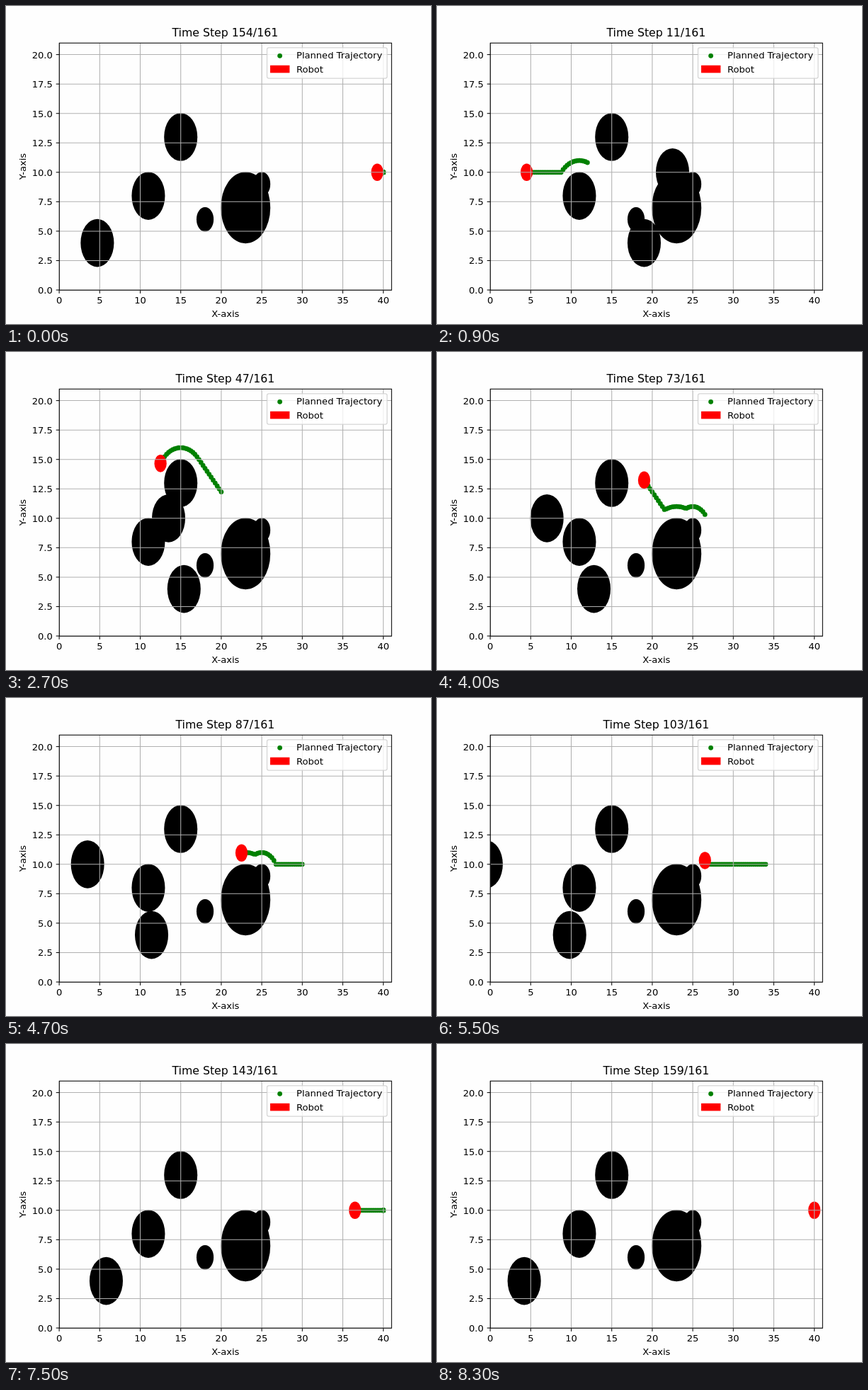
Write an HTML page with a canvas that moves like this. It is 600x449 px and loops after 8400 ms.

```html
<!DOCTYPE html>
<html lang="en">
<head>
<meta charset="utf-8">
<title>Robot path planning</title>
<style>
  html, body { margin: 0; width: 100%; height: 100%; overflow: hidden; background: #fefefe; }
  canvas { display: block; width: 600px; height: 449px; }
</style>
</head>
<body>
<canvas id="plot" width="600" height="449"></canvas>
<script>
const ctx = document.getElementById('plot').getContext('2d');
const TICK_MS = 100, TICKS = 84, FIRST_STEP = 154, STEPS = 161;
const UNIT_X = 11.44, UNIT_Y = 16.62;
const px = x => 75.1 + UNIT_X * x;
const py = y => 401 - UNIT_Y * y;
const LEFT = px(0) + 0.2, RIGHT = px(41) + 0.2, TOP = py(21) + 0.3, BOTTOM = py(0) + 0.2;

const GOAL_X = 40, CRUISE_Y = 10, SPEED = 0.25, HORIZON = 30, CLEARANCE = 1;
const DODGE_START = 29, REPLAN = 34, DODGE_END = 47;

const low = [11, 8, 2], high = [15, 13, 2], large = [23, 7, 3], small = [25, 9, 1];
const fixedObstacles = [low, high, large, small, [18, 6, 1]];
const movingObstacles = step => [[20.1 - 0.1 * step, 4, 2], [25.25 - 0.25 * step, 10, 2]];

// Lowest safe height above an obstacle, or the cruise height beside it.
function over([cx, cy, r], x) {
  const h = (r + CLEARANCE) ** 2 - (x - cx) ** 2;
  return h > 0 ? Math.max(CRUISE_Y, cy + Math.sqrt(h)) : CRUISE_Y;
}

// Over the low obstacle, then diagonally under the approaching one.
const firstRoute = x => Math.max(Math.min(over(low, x), 23.8 - x), x - 8.75);

// Over the high obstacle, off it along the 45 degree tangent, then over the pair.
function finalRoute(x) {
  const reach = (high[2] + CLEARANCE) * Math.SQRT2;
  const tangent = x > high[0] + reach / 2 ? high[0] + high[1] + reach - x : 0;
  return Math.max(tangent, ...[high, large, small].map(o => over(o, x)));
}

function robotAt(step) {
  const startX = 2 + SPEED * (DODGE_START - 1), endX = 12.5;
  if (step < DODGE_START) {
    const x = startX - SPEED * (DODGE_START - step);
    return [x, firstRoute(x)];
  }
  if (step < DODGE_END) {
    const p = (step - DODGE_START) / (DODGE_END - DODGE_START);
    const startY = firstRoute(startX);
    return [startX + (endX - startX) * p, startY + (finalRoute(endX) - startY) * p];
  }
  const x = Math.min(GOAL_X, endX + SPEED * (step - DODGE_END));
  return [x, finalRoute(x)];
}

function plannedPoint(step, ahead) {
  if (step >= REPLAN) return robotAt(step + ahead);
  const x = robotAt(step)[0] + SPEED * ahead;
  return [x, firstRoute(x)];
}

function ellipse(cx, cy, rx, ry, color) {
  ctx.fillStyle = color;
  ctx.beginPath();
  ctx.ellipse(cx, cy, rx, ry, 0, 0, 2 * Math.PI);
  ctx.fill();
}

// The extra 0.65 is half of the patch outline.
const disc = (x, y, r, color) =>
  ellipse(px(x), py(y), r * UNIT_X + 0.65, r * UNIT_Y + 0.65, color);

const dot = (x, y) => ellipse(x, y, 3.4, 3.4, '#008000');

function line(x1, y1, x2, y2, color) {
  ctx.strokeStyle = color;
  ctx.lineWidth = 1.04;
  ctx.beginPath();
  ctx.moveTo(x1, y1);
  ctx.lineTo(x2, y2);
  ctx.stroke();
}

function text(str, x, y, align = 'center', size = 13.08) {
  ctx.font = `${size}px "DejaVu Sans", sans-serif`;
  ctx.textAlign = align;
  ctx.fillStyle = '#000';
  ctx.fillText(str, x, y);
}

function drawAxes() {
  for (let v = 0; v <= 40; v += 5) {
    const x = px(v);
    line(x, TOP, x, BOTTOM, '#b0b0b0');
    line(x, BOTTOM, x, BOTTOM + 4.6, '#000');
    text(v, x, 420.2);
  }
  for (let v = 0; v <= 20; v += 2.5) {
    const y = py(v);
    line(LEFT, y, RIGHT, y, '#b0b0b0');
    line(LEFT - 4.6, y, LEFT, y, '#000');
    text(v.toFixed(1), 65.8, y + 4.9, 'right');
  }
  ctx.strokeStyle = '#000';
  ctx.strokeRect(LEFT, TOP, RIGHT - LEFT, BOTTOM - TOP);
  text('X-axis', 309.8, 438.5);
  ctx.save();
  ctx.translate(27.5, 226.5);
  ctx.rotate(-Math.PI / 2);
  text('Y-axis', 0, 0);
  ctx.restore();
}

function drawLegend() {
  ctx.beginPath();
  ctx.roundRect(368.5, 58.8, 169.5, 43.4, 2.6);
  ctx.fillStyle = 'rgba(255,255,255,0.8)';
  ctx.fill();
  ctx.strokeStyle = 'rgba(204,204,204,0.8)';
  ctx.lineWidth = 1.3;
  ctx.stroke();
  dot(386.6, 70.3);
  ctx.fillStyle = '#f00';
  ctx.fillRect(373, 83.8, 27.4, 10.6);
  text('Planned Trajectory', 410, 74.3, 'left');
  text('Robot', 410, 93.8, 'left');
}

function draw(step) {
  ctx.fillStyle = '#fefefe';
  ctx.fillRect(0, 0, 600, 449);

  ctx.save();
  ctx.beginPath();
  ctx.rect(LEFT, TOP, RIGHT - LEFT, BOTTOM - TOP);
  ctx.clip();
  for (const [x, y, r] of [...fixedObstacles, ...movingObstacles(step)]) disc(x, y, r, '#000');
  for (let i = 1; i <= HORIZON; i++) {
    const [x, y] = plannedPoint(step, i);
    dot(px(x), py(y));
  }
  disc(...robotAt(step), 0.7, '#f00');
  ctx.restore();

  drawAxes();
  drawLegend();
  text(`Time Step ${step}/${STEPS}`, 309.3, 43.4, 'center', 15.75);
}

let shown = -1;
function frame() {
  const tick = Math.floor(performance.now() / TICK_MS) % TICKS;
  if (tick !== shown) draw((FIRST_STEP + 2 * tick) % STEPS);
  shown = tick;
  requestAnimationFrame(frame);
}
frame();
</script>
</body>
</html>
```
